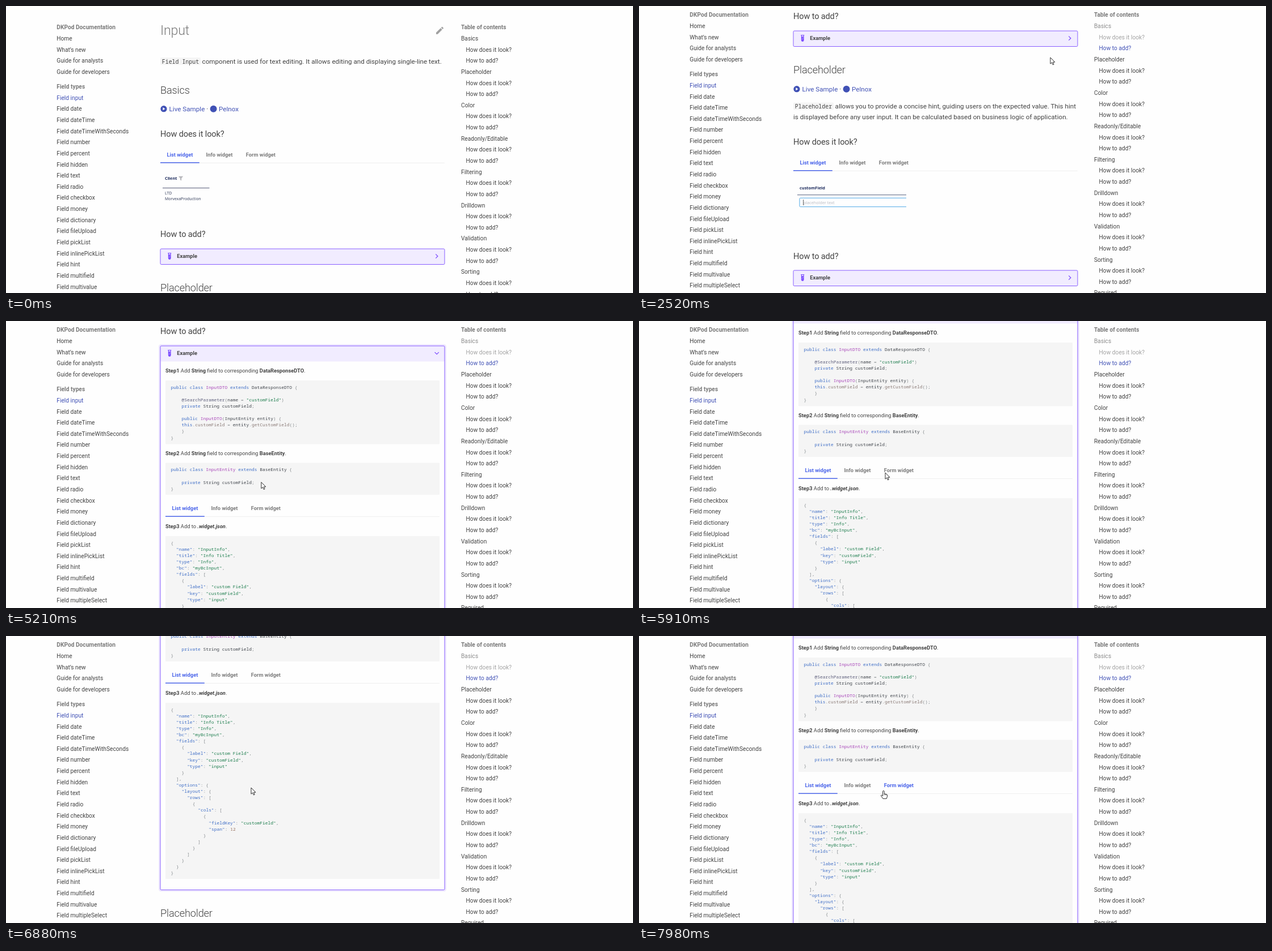
Animation of 1105 by 507 pixels, one loop 8000 ms. Source, as an HTML page:

```html
<!DOCTYPE html>
<html lang="en">
<head>
<meta charset="utf-8">
<title>Input documentation</title>
<style>
  html, body { margin: 0; width: 100%; height: 100%; overflow: hidden; background: #fefefe; }
  svg { display: block; width: 100vw; height: 100vh; font-family: Roboto, sans-serif; }
  .mono { font-family: "Noto Sans Mono", "DejaVu Sans Mono", monospace; }
  .shot { font-family: "Noto Sans", "Open Sans", sans-serif; }
</style>
</head>
<body>
<svg id="stage" viewBox="0 0 1105 507"></svg>
<script>
const LOOP = 8000, JUMP = 2280, OPEN = 3930, FORM_HOVER = 7940;
const INK = '#434343', GREY = '#7b7b7b', LINK = '#4051b5', ACCENT = '#4b65ea', VIOLET = '#7c4dff';
const ROW = 19.635, SIDE_SHIFT = 21.8, PAGE_SHIFT = 385, GROWTH = 639;

// Font sizes of the page, at its zoom
const ZOOM = 0.7285, NAV = 14 * ZOOM, BODY = 16 * ZOOM, SMALL = 12.8 * ZOOM, CODE = 10.88 * ZOOM;
const H1 = 32 * ZOOM, H2 = 25 * ZOOM, H3 = 20 * ZOOM;
const stage = document.getElementById('stage');

function el(tag, attrs, parent = stage) {
  const node = document.createElementNS('http://www.w3.org/2000/svg', tag);
  for (const k in attrs) node.setAttribute(k, attrs[k]);
  parent.appendChild(node);
  return node;
}
const group = (parent, attrs = {}) => el('g', attrs, parent);
const rect = (p, x, y, width, height, fill, more = {}) => el('rect', { x, y, width, height, fill, ...more }, p);
const move = (node, x, y) => node.setAttribute('transform', `translate(${x} ${y})`);
const show = (node, on) => node.setAttribute('display', on ? 'inline' : 'none');

// y is the middle of the capital letters
function text(p, str, x, y, size, fill = INK, more = {}) {
  const node = el('text', { x, y: y + size * 0.355, 'font-size': size, fill, ...more }, p);
  node.textContent = str;
  return node;
}
const bold = { 'font-weight': 700 };

function heading(p, str, y, size) {
  text(p, str, 272, y, size, size === H1 ? GREY : INK,
    { 'font-weight': size === H3 ? 400 : 300, 'letter-spacing': -size * 0.01 });
}

function inlineCode(p, str, y) {
  rect(p, 272, y - 6.5, 71, 13, '#f5f5f5', { rx: 1.4 });
  text(p, str, 274.8, y + 0.5, BODY * 0.85, INK, { class: 'mono' });
}

function links(p, y) {
  el('circle', { cx: 278, cy: y - 0.3, r: 5.6, fill: LINK }, p);
  el('path', { d: `M276.4 ${y - 2.9}v5.2l4-2.6z`, fill: '#fff' }, p);
  text(p, 'Live Sample', 287.6, y, BODY, LINK);
  text(p, '·', 353.2, y, BODY);
  el('circle', { cx: 365.6, cy: y - 0.3, r: 6, fill: LINK }, p);
  text(p, 'Pelnox', 375, y, BODY, LINK);
}

function tabs(p, x, y, right) {
  rect(p, x, y + 14.2, right - x, 0.8, '#ececec');
  rect(p, x, y + 13.4, 68.8, 1.5, ACCENT);
  return ['List widget', 'Info widget', 'Form widget'].map((s, i) =>
    text(p, s, x + [11.5, 80.6, 150.8][i], y, SMALL, i ? GREY : ACCENT, bold));
}

function admonition(p, y) {
  const ring = rect(p, 270.4, y - 1.5, 504.2, 30.5, 'none',
    { rx: 3, stroke: VIOLET, 'stroke-width': 2.9 });
  show(ring, false);
  rect(p, 272, y, 501, 27.5, '#f1ecff', { rx: 1.5 });
  const frame = rect(p, 272, y, 501, 27.5, 'none', { rx: 1.8, stroke: VIOLET, 'stroke-width': 0.9 });
  const mid = y + 12.6;
  el('path', {
    transform: `translate(281 ${mid - 6.9}) scale(.604)`, fill: VIOLET, 'fill-rule': 'evenodd',
    d: 'M7 2v2h1v14a4 4 0 0 0 8 0V4h1V2zM10 4h4v3h-4zM10 15a1 1 0 1 0 2 0a1 1 0 1 0-2 0zM12 11a1 1 0 1 0 2 0a1 1 0 1 0-2 0z'
  }, p);
  text(p, 'Example', 301.3, mid, SMALL, INK, bold);
  const chevron = group(p);
  el('path', { d: 'M-1.9-3.6L1.7 0L-1.9 3.6', fill: 'none', stroke: VIOLET, 'stroke-width': 1.3 }, chevron);
  move(chevron, 759.2, mid + 0.4);
  return { ring, frame, chevron, mid: mid + 0.4 };
}

const KEYWORD = '#3f6ec6', NAME = '#a846b9', MUTED = '#8a7a76';
const KEYWORDS = ['public', 'private', 'class', 'extends', 'this'];

function tokenColor(tok, next, line) {
  if (tok[0] === '"') return next[0] === ':' ? KEYWORD : '#1c7d4d';
  if (/^\d/.test(tok)) return '#96705e';
  if (tok[0] === '@') return '#5e5f7c';
  if (KEYWORDS.includes(tok)) return KEYWORD;
  if (tok === 'InputDTO' || tok === 'InputEntity' && line.includes('class')) return NAME;
  if (/customField/i.test(tok) && line.includes('this')) return MUTED;
  return /^\w/.test(tok) ? '#40454c' : '#868b8e';
}

function codeBlock(p, top, bottom, lines) {
  rect(p, 281, top, 483, bottom - top, '#f5f5f5', { rx: 1 });
  lines.forEach((line, i) => {
    const body = line.trim(), indent = line.length - line.trimStart().length;
    const node = text(p, '', 290.6 + indent * CODE * 0.6, top + 12 + i * CODE * 1.4, CODE, INK, { class: 'mono' });
    const parts = body.split(/("[^"]*"|@?\w+)/).filter(Boolean);
    parts.forEach((tok, k) => {
      el('tspan', { fill: tokenColor(tok, parts[k + 1] || '', line) }, node).textContent = tok;
    });
  });
}

// Alternating plain and *bold* pieces
function step(p, str, y, italic) {
  const node = text(p, '', 281, y, SMALL);
  str.split('*').forEach((s, i) => {
    const style = i % 2 ? { 'font-weight': 700, 'font-style': italic && i > 1 ? 'italic' : 'normal' } : {};
    if (s) el('tspan', style, node).textContent = s;
  });
}

// Article
const main = group(stage);
heading(main, 'Input', 43.2, H1);
el('path', {
  transform: 'translate(755.8 34.6) scale(.725)', fill: '#a0a0a0',
  d: 'M20.7 7c.4-.4.4-1 0-1.4l-2.3-2.3c-.4-.4-1-.4-1.4 0l-1.8 1.8 3.7 3.7zM3 17.2V21h3.8L17.8 9.9l-3.7-3.7z'
}, main);
inlineCode(main, 'Field Input', 97.5);
text(main, 'component is used for text editing. It allows editing and displaying single-line text.', 345.6, 97.5, BODY);
heading(main, 'Basics', 148.3, H2);
links(main, 182);
heading(main, 'How does it look?', 225.8, H3);
tabs(main, 272, 262.6, 773);
text(main, 'Client', 280, 304.3, 7.3, '#1c2a5c', { ...bold, class: 'shot' });
el('path', { d: 'M304 300.8h8.2l-3 3.8v4l-2.2-1.4v-2.6z', fill: '#b9b9bd' }, main);
rect(main, 276, 321, 82.5, 1, '#555a78');
text(main, 'LTD', 280, 331, 6.9, '#39425f', { class: 'shot' });
text(main, 'MorvexaProduction', 280, 341, 6.9, '#39425f', { class: 'shot' });
heading(main, 'How to add?', 403.3, H3);
const example = admonition(main, 429);

// Expanded body of the first example
const body = group(main);
move(body, 0, 452);
step(body, '*Step1* Add *String* field to corresponding *DataResponseDTO*.', 20.6);
codeBlock(body, 38, 150.5, [
  'public class InputDTO extends DataResponseDTO {', '',
  '    @SearchParameter(name = "customField")',
  '    private String customField;', '',
  '    public InputDTO(InputEntity entity) {',
  '    this.customField = entity.getCustomField();',
  '    }', '}']);
step(body, '*Step2* Add *String* field to corresponding *BaseEntity*.', 166.7);
codeBlock(body, 183.6, 240, [
  'public class InputEntity extends BaseEntity {', '', '    private String customField;', '}']);
const bodyTabs = tabs(body, 281, 264, 764);
step(body, '*Step3* Add to *.widget.json*.', 295.2, true);
codeBlock(body, 313, 624, `{
  "name": "InputInfo",
  "title": "Info Title",
  "type": "Info",
  "bc": "myBcInput",
  "fields": [
    {
      "label": "custom Field",
      "key": "customField",
      "type": "input"
    }
  ],
  "options": {
    "layout": {
      "rows": [
        {
          "cols": [
            {
              "fieldKey": "customField",
              "span": 12
            }
          ]
        }
      ]
    }
  }
}`.split('\n'));

// Section that is pushed down when the example opens
const after = group(main);
heading(after, 'Placeholder', 498, H2);
links(after, 532);
inlineCode(after, 'Placeholder', 562);
text(after, 'allows you to provide a concise hint, guiding users on the expected value. This hint', 345.6, 562, BODY);
text(after, 'is displayed before any user input. It can be calculated based on business logic of application.', 272, 581.2, BODY);
heading(after, 'How does it look?', 624.8, H3);
tabs(after, 272, 661.6, 773);
text(after, 'customField', 283, 706, 7.4, '#1c2a5c', { ...bold, class: 'shot' });
rect(after, 279, 718.2, 192, 1, '#55607f');
el('path', {
  d: 'M471 724.2H284.5q-1.5 0-1.5 1.5v12.5q0 1.5 1.5 1.5H471', fill: 'none', stroke: '#4fa9e6'
}, after);
text(after, 'placeholder text', 290, 732.2, 7.2, '#b9bcc4', { class: 'shot' });
rect(after, 289.3, 727, 0.8, 10, '#333');
heading(after, 'How to add?', 826.8, H3);
admonition(after, 852);

// Navigation on the left
const nav = group(stage);
text(nav, 'DKPod Documentation', 89.3, 37.6, NAV, GREY, bold);
['Home', 'What’s new', 'Guide for analysts', 'Guide for developers'].forEach((s, i) =>
  text(nav, s, 89.3, 57.4 + i * ROW, NAV));
text(nav, 'Field types', 89.3, 142.5, NAV, GREY, bold);
('input date dateTime dateTimeWithSeconds number percent hidden text radio checkbox money dictionary ' +
 'fileUpload pickList inlinePickList hint multifield multivalue multipleSelect').split(' ').forEach((s, i) =>
  text(nav, 'Field ' + s, 89.3, 162.1 + i * ROW, NAV, i ? INK : LINK));

// Table of contents on the right
const toc = group(stage);
text(toc, 'Table of contents', 802, 37.6, NAV, GREY, bold);
const rowY = i => 57.4 + i * ROW;
const rows = [];
for (const s of ['Basics', 'Placeholder', 'Color', 'Readonly/Editable', 'Filtering', 'Drilldown', 'Validation', 'Sorting', 'Required'])
  for (const label of [s, 'How does it look?', 'How to add?'])
    rows.push(text(toc, label, label === s ? 802 : 810.6, rowY(rows.length), NAV));
const bar = rect(stage, 961.4, 31, 2.6, 444, '#adadad');

// Pointer
const click = el('circle', { r: 8.3, fill: '#f3ea4e', 'fill-opacity': 0.85 });
const pointer = group(stage, { fill: '#fff', stroke: '#222', 'stroke-width': 0.95, 'stroke-linejoin': 'round' });
const arrow = el('path', { d: 'M0 0V11.2L2.6 8.8L4.4 12.9L6.2 12.1L4.5 8.2H8z' }, pointer);
const hand = group(pointer);
el('path', { d: 'M-1.4 8.5V1.2a1.3 1.3 0 0 1 2.6 0V5.2l4.2 1.1q1.4.4 1.3 1.9l-.5 3-1 2.6h-6.2L-4.2 9.3q-.9-1.4.3-1.8 1-.2 2.5 1.8z' }, hand);
el('path', { d: 'M1.2 5.2v2.6M3.2 5.8v2M5 6.3v1.8', fill: 'none', 'stroke-width': 0.7 }, hand);

const PATH = [
  [30, 1026, 160], [810, 836, 113], [900, 835, 103], [1300, 833, 78.5], [1570, 833, 78.5],
  [1920, 832, 94], [JUMP, 832, 94], [3080, 340, 80], [3120, 340, 80], [3240, 349.5, 61.8],
  [4530, 349.5, 61.8], [4800, 290, 170], [5100, 472, 308], [5300, 434, 268], [6050, 434, 268],
  [6630, 432, 268], [7160, 432, 268], [7340, 430.5, 270], [7620, 430.5, 270], [7970, 431, 273.5]
];
const clamp = u => Math.max(0, Math.min(1, u));
const span = (t, a, b) => clamp((t - a) / (b - a));
const smooth = u => u * u * (3 - 2 * u);

function cursorAt(t) {
  let i = 1;
  while (i < PATH.length - 1 && t > PATH[i][0]) i++;
  const a = PATH[i - 1], b = PATH[i], u = smooth(span(t, a[0], b[0]));
  return { x: a[1] + (b[1] - a[1]) * u, y: a[2] + (b[2] - a[2]) * u };
}

function rowUnder(t) {
  const c = cursorAt(t);
  if (t < 30 || c.x < 800 || c.x > 893) return -1;
  const i = Math.round((c.y + (t < JUMP ? 0 : SIDE_SHIFT) - rowY(0)) / ROW);
  return rows[i] ? i : -1;
}

function scrollAt(t) {
  if (t < JUMP) return 0;
  const first = 1 - (1 - span(t, 5340, 5910)) ** 2;
  const down = 1 - (1 - span(t, 6050, 6880)) ** 1.35;
  return PAGE_SHIFT + 67 * first + 195 * (down - smooth(span(t, 7620, 7970)));
}

function mix(a, b, u) {
  const part = (c, i) => parseInt(c.slice(1 + 2 * i, 3 + 2 * i), 16);
  return `rgb(${[0, 1, 2].map(i => Math.round(part(a, i) + (part(b, i) - part(a, i)) * u))})`;
}

function draw(t) {
  const jumped = t >= JUMP, open = t >= OPEN, c = cursorAt(t);
  const growth = open ? GROWTH : 0, sideY = jumped ? -SIDE_SHIFT : 0;
  move(main, 0, -scrollAt(t));
  move(after, 0, growth);
  show(body, open);
  show(example.ring, open);
  example.ring.setAttribute('stroke-opacity', 0.12 * span(t, OPEN, OPEN + 125));
  example.ring.setAttribute('height', 30.5 + growth);
  example.frame.setAttribute('height', 27.5 + growth);
  example.chevron.setAttribute('transform',
    `translate(759.2 ${example.mid}) rotate(${90 * smooth(span(t, OPEN, OPEN + 250))})`);
  bodyTabs[2].setAttribute('fill', t >= FORM_HOVER ? ACCENT : GREY);

  move(nav, 0, sideY);
  move(toc, 0, sideY);
  // Link colours ease over 125 ms, so average the recent hover state
  const recent = [0, 25, 50, 75, 100].map(d => rowUnder(t - d));
  rows.forEach((row, i) => {
    const base = jumped && i < 3 ? ['#8c8c8c', '#a3a3a3', LINK][i] : INK;
    row.setAttribute('fill', mix(base, '#526cfe', recent.filter(r => r === i).length / 5));
  });
  show(bar, t >= 30 && c.x > 795 && c.x < 975);
  bar.setAttribute('y', jumped ? 9 : 31);
  bar.setAttribute('height', jumped ? 466 : 444);

  const onTitle = t > 3120 && t < 4800 && c.y < 71;
  const pointing = rowUnder(t) >= 0 || onTitle || t >= FORM_HOVER;
  show(pointer, t >= 30);
  show(hand, pointing);
  show(arrow, !pointing);
  move(pointer, c.x, c.y);
  move(click, c.x + 0.5, c.y - 0.3);
  show(click, (t >= 2120 && t < JUMP) || (t >= 3810 && t < OPEN));
}

function tick() {
  draw(performance.now() % LOOP);
  requestAnimationFrame(tick);
}
tick();
</script>
</body>
</html>
```
